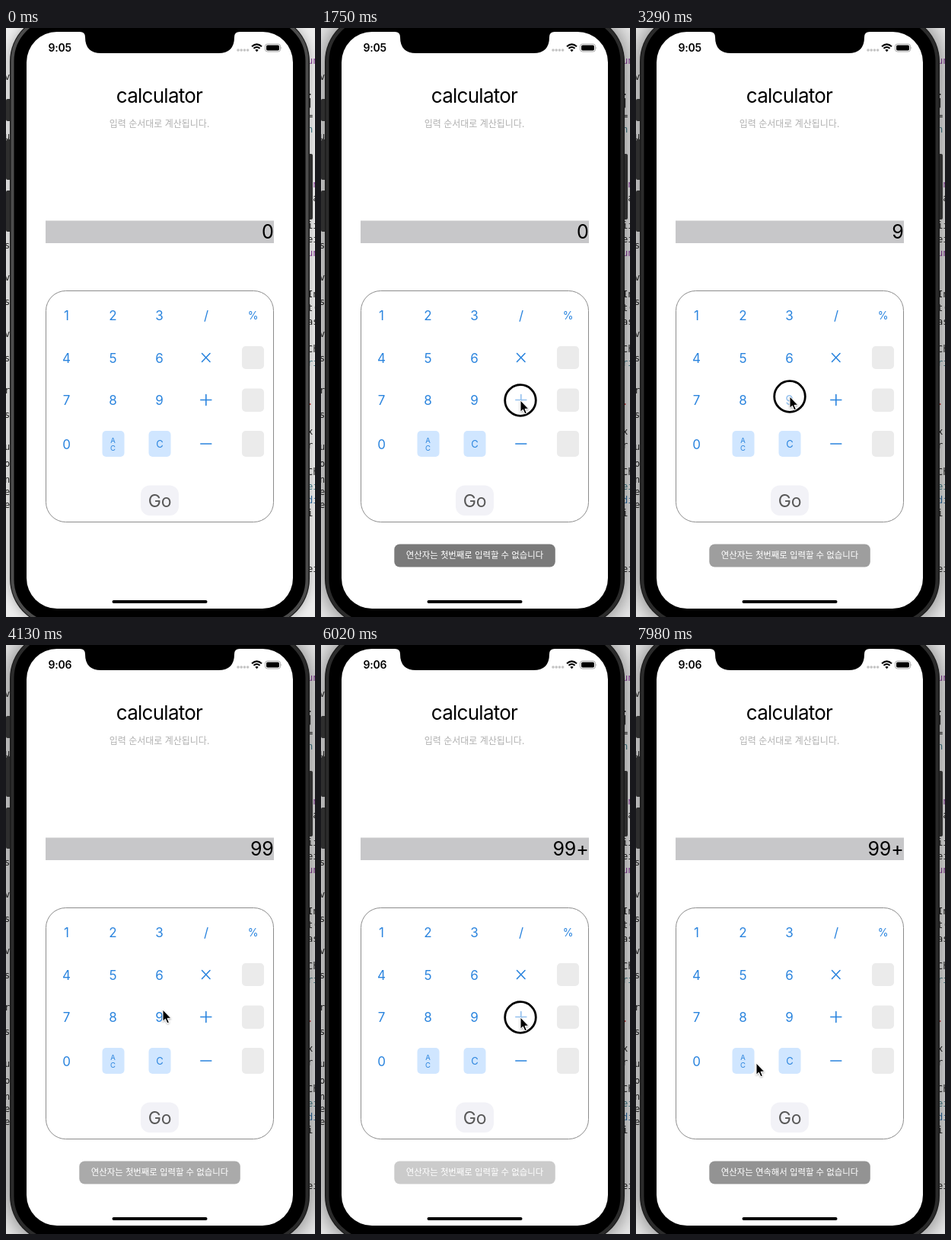
Animation of 406 by 772 pixels, one loop 8 s. Source, as an HTML page:

```html
<!DOCTYPE html>
<html lang="ko">
<head>
<meta charset="utf-8">
<title>calculator</title>
<style>
html, body { margin: 0; width: 100%; height: 100%; overflow: hidden; background: #ededed; }
svg { display: block; width: 406px; height: 772px; font-family: Inter, "Liberation Sans", sans-serif; }
.mid { text-anchor: middle; }
.ko { font-family: "Noto Sans CJK KR", "Noto Sans CJK", "Noto Sans CJK JP", sans-serif; text-anchor: middle; }
.code { font: 12px "DejaVu Sans Mono", monospace; fill: #222; }
.key { fill: #2a84de; font-size: 17px; text-anchor: middle; }
.line { fill: none; stroke: #2a84de; stroke-width: 1.6; stroke-linecap: round; }
</style>
</head>
<body>
<svg viewBox="0 0 406 772" xmlns="http://www.w3.org/2000/svg">
  <defs>
    <filter id="soft" x="-30%" y="-30%" width="160%" height="160%"><feGaussianBlur stdDeviation="7"/></filter>
    <filter id="wide" x="-30%" y="-30%" width="160%" height="160%"><feGaussianBlur stdDeviation="16"/></filter>
    <filter id="drop" x="-50%" y="-50%" width="200%" height="200%"><feDropShadow dx="0" dy="1" stdDeviation=".9" flood-opacity=".35"/></filter>
  </defs>
  <rect width="406" height="772" fill="#ededed"/>
  <g id="code"></g>

  <rect id="shade" x="5" y="-18" width="394" height="802" rx="62"/>
  <g fill="#2e2e2e">
    <rect x="0" y="93" width="8" height="29" rx="2"/>
    <rect x="0" y="146" width="8" height="53" rx="2"/>
    <rect x="0" y="213" width="8" height="54" rx="2"/>
    <rect x="395" y="165" width="8" height="86" rx="2"/>
  </g>
  <rect x="5" y="-18" width="394" height="802" rx="62" fill="#1b1b1b"/>
  <rect id="rim" x="8.5" y="-14.5" width="387" height="795" rx="58" fill="#000" stroke-width="4"/>
  <rect x="13" y="-10" width="378" height="786" rx="54" fill="#000"/>
  <rect x="27" y="5" width="350" height="756" rx="40" fill="#fff"/>
  <path d="M97 4H307V5Q300 5 300 12Q300 33 279 33H125Q104 33 104 12Q104 5 97 5Z"/>

  <text id="clock" x="55.5" y="31" font-size="14" font-weight="600" letter-spacing="-.2"></text>
  <g fill="#c4c4c4"><circle cx="305" cy="29" r="1.8"/><circle cx="309.2" cy="29" r="1.8"/><circle cx="313.4" cy="29" r="1.8"/><circle cx="317.6" cy="29" r="1.8"/></g>
  <g fill="none" stroke="#000" stroke-width="2">
    <path d="M323 24.2Q329.500 18.500 336 24.200"/><path d="M325.400 26.800Q329.500 23.200 333.600 26.800"/>
  </g>
  <path d="M327.300 28.800Q329.500 27 331.700 28.800L329.500 31.200Z"/>
  <rect x="340.500" y="21" width="20" height="10" rx="3" fill="none" stroke="#a8a8a8"/>
  <rect x="342" y="22.500" width="17" height="7" rx="1.700"/>
  <path d="M361.500 24.500Q363.200 26 361.500 27.800Z" fill="#a8a8a8"/>

  <text class="mid" x="201.500" y="98" font-size="26" letter-spacing="-.75">calculator</text>
  <text class="ko" x="201.500" y="129.500" font-size="12" fill="#b0b0b0">입력 순서대로 계산됩니다.</text>
  <rect x="52" y="252.500" width="300" height="29.500" fill="#c7c7c9"/>
  <text id="total" x="351.500" y="276" font-size="25" text-anchor="end" letter-spacing="-.2"></text>

  <rect x="52.500" y="344.500" width="299" height="303" rx="26" fill="none" stroke="#8c8c8c"/>
  <g id="keys"></g>
  <path class="line" d="M257.500 426.500l10.500 11m0-11l-10.500 11"/>
  <path class="line" id="plus" d="M255.800 487.500h14M262.800 480.500v14"/>
  <path class="line" d="M255.800 545h14"/>
  <rect x="177" y="599.500" width="50" height="39.500" rx="12" fill="#f2f2f7"/>
  <text class="mid" x="202" y="628" font-size="23" letter-spacing="-.3" fill="#585858">Go</text>

  <g id="toast">
    <rect x="96.300" y="676.500" width="211.500" height="30" rx="7" fill="#000" fill-opacity=".6"/>
    <text id="note" class="ko" x="202" y="695.300" font-size="11.400" fill="#fff"></text>
  </g>
  <rect x="139.500" y="750" width="125" height="4" rx="2"/>

  <circle id="ring" r="20.300" fill="none" stroke="#000" stroke-width="2.800"/>
  <path id="arrow" d="M0 0V15.300L3.400 12.200L5.900 17.800L8.400 16.700L6 11.300H10.800Z" stroke="#fff" stroke-width="1" filter="url(#drop)"/>
</svg>
<script>
const LOOP = 8000, STEP = 70;
const $ = id => document.getElementById(id);

function add(parent, tag, attrs, text = "") {
  const el = document.createElementNS("http://www.w3.org/2000/svg", tag);
  for (const k in attrs) el.setAttribute(k, attrs[k]);
  el.textContent = text;
  parent.append(el);
  return el;
}

// Editor text peeking out at both sides of the phone
const leftCode = "vi 64,u 142,s 285,v 327,s 359,v 401,s 433,r 475,s 507,u 549,or 571,ni 592,er 608,e 625";
const rightCode = "un 43 p,. 84,| 98,= 115,n 133 t,un 205 p,ca 223,l 241,ii 259,ei 277,un 295 p,In 349,t( 367,as 385," +
  "Ch 421,ri 439 t,. 490 r,x 529,r 547,Ch 582,ei 601 t,di 619 b,i 636,ei 709";
const inks = { p: "#8a3a9c", t: "#3f7d8c", r: "#c33", b: "#2f6fa8" };
[[leftCode, -2], [rightCode, 396]].forEach(([list, x]) => list.split(",").forEach(item => {
  const [word, y, ink] = item.split(" ");
  add($("code"), "text", { class: "code", x, y: +y + 4, style: `fill:${inks[ink] || "#222"}` }, word);
}));

// Keypad
const cols = [79.5, 140.5, 201.5, 263, 324.5], rows = [377, 432.5, 488, 545.5];
const keys = $("keys");
const box = (x, y, h, fill) => add(keys, "rect", { x, y, width: 29, height: h, rx: 5, fill });
const label = (text, x, y, size) => add(keys, "text", { class: "key", x, y, style: `font-size:${size}px` }, text);
box(310, 417, 30, "#ebebeb");
box(310, 472.5, 30.5, "#ebebeb");
box(310, 528, 34, "#ebebeb");
box(126.5, 528, 34, "#d0e6ff");
box(187.5, 528, 34, "#d0e6ff");
const digits = [];
for (let n = 1; n <= 9; n++) {
  digits[n] = label(n, cols[(n - 1) % 3], rows[Math.floor((n - 1) / 3)] + 6, 17);
}
label("0", cols[0], rows[3] + 6, 17);
label("/", cols[3], rows[0] + 5.5, 17);
label("%", cols[4], rows[0] + 4.5, 14);
label("A", 140.5, 543.5, 9.5);
label("C", 140.5, 554.3, 9.5);
label("C", 202, 550, 13);

// Rows of time, x, y
const path = [
  [350, 221, 770], [630, 262, 655], [910, 281, 574], [1050, 281, 574], [1400, 266, 514], [1540, 262, 488],
  [1890, 262, 488], [2100, 264, 605], [2590, 264, 605], [3010, 202, 483], [3150, 202, 483], [3920, 202, 483],
  [4130, 206, 478], [4340, 228, 468], [4760, 259, 504], [5180, 259, 504], [5460, 262, 488], [6230, 262, 488],
  [6510, 271, 569], [7140, 271, 569], [7280, 218, 554], [7350, 186, 549], [7490, 186, 549],
  [7630, 160, 569], [7770, 137, 558], [7870, 140, 528], [7980, 158, 548]
];
const clicks = [[1610, 1820, "+"], [3150, 3360, "9"], [3570, 3780, "9"], [4830, 5040, "+"], [5950, 6160, "+"]];
const toasts = [
  { text: "연산자는 첫번째로 입력할 수 없습니다", fade: [[1680, .88], [2590, .70], [4130, .555], [6020, .34], [6089, .33]] },
  { text: "연산자는 연속해서 입력할 수 없습니다", fade: [[6090, 1], [7280, .81], [7980, .70], [8000, .7]] }
];
const totals = [[0, "0"], [3220, "9"], [3640, "99"], [4900, "99+"]];

function at(table, t, col, ease = k => k) {
  let i = 0;
  while (i < table.length - 2 && t >= table[i + 1][0]) i++;
  const a = table[i], b = table[i + 1];
  const k = Math.min(1, Math.max(0, (t - a[0]) / (b[0] - a[0])));
  return a[col] + (b[col] - a[col]) * ease(k);
}
const glide = k => k + .6 * k * (1 - k) * (2 * k - 1) * -1;

// A pressed key dims at once, then recovers
function keyAlpha(name, t) {
  const c = clicks.filter(c => c[2] === name && t >= c[0]).pop();
  if (!c) return 1;
  return t < c[1] ? .5 : Math.min(1, .5 + (t - c[1]) / 400);
}

function draw(t) {
  const focused = t >= 1610;
  const shade = $("shade");
  shade.setAttribute("filter", focused ? "url(#wide)" : "url(#soft)");
  shade.setAttribute("opacity", focused ? .55 : .28);
  $("rim").setAttribute("stroke", focused ? "#2b2b2b" : "#4c4c4c");

  $("clock").textContent = t < 3500 ? "9:05" : "9:06";
  $("total").textContent = totals.filter(r => t >= r[0]).pop()[1];

  const toast = toasts.filter(o => t >= o.fade[0][0]).pop();
  $("toast").setAttribute("opacity", toast ? at(toast.fade, t, 1) : 0);
  $("note").textContent = toast ? toast.text : "";

  digits[9].setAttribute("opacity", keyAlpha("9", t));
  $("plus").setAttribute("opacity", keyAlpha("+", t));

  const x = at(path, t, 1, glide), y = at(path, t, 2, glide);
  const move = `translate(${x} ${y})`;
  $("arrow").setAttribute("transform", move);
  $("arrow").setAttribute("visibility", t < 350 ? "hidden" : "visible");
  $("ring").setAttribute("transform", move);
  $("ring").setAttribute("visibility", clicks.some(c => t >= c[0] && t < c[1]) ? "visible" : "hidden");
}

const start = performance.now();
function tick() {
  const t = (performance.now() - start) % LOOP;
  draw(Math.floor(t / STEP) * STEP);
  requestAnimationFrame(tick);
}
draw(0);
requestAnimationFrame(tick);
</script>
</body>
</html>
```
